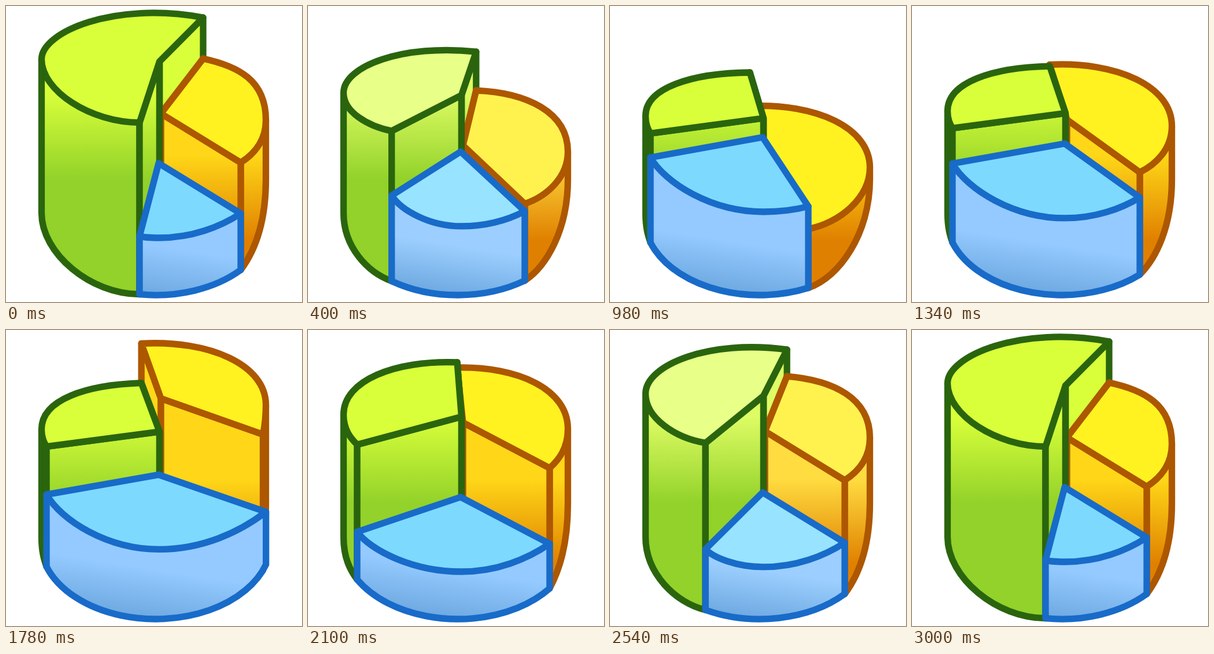
An HTML page with a canvas that plays this animation: 512 by 512 pixels, repeating every 3020 ms.

```html
<!DOCTYPE html>
<html>
<head>
<meta charset="utf-8">
<style>
html, body { margin: 0; width: 100%; height: 100%; overflow: hidden; background: #fff; }
canvas { display: block; width: 512px; height: 512px; }
</style>
</head>
<body>
<canvas id="stage" width="512" height="512"></canvas>
<script>
const ctx = document.getElementById('stage').getContext('2d');
const LOOP = 3020, LEFT = 61.5, RIGHT = 449.5, FLOOR = 380;
const FOOT = { x: 259, y: 365, rx: 200, ry: 135 };

// green, orange, blue: height of each slice's inner corner
// left, right, back: x of the three cuts; drop, rise: how far the left and back cuts reach
const full = { green: 96, orange: 186, blue: 272, left: 231, drop: 126, right: 406, back: 341, rise: 76, light: 0 };
const even = { green: 154, orange: 241, blue: 252, left: 145, drop: 76, right: 375, back: 291, rise: 75, light: 1 };
const low = { green: 194, orange: 268, blue: 227, left: 70, drop: 35, right: 343, back: 242, rise: 79, light: 0 };
const wide = { green: 176, orange: 118, blue: 250, left: 70, drop: 34, right: 450, back: 234, rise: 84, light: 0 };
const round = { green: 150, orange: 160, blue: 289, left: 85, drop: 60, right: 418, back: 258, rise: 94, light: 0 };
const tall = { green: 114, orange: 175, blue: 281, left: 165, drop: 98, right: 406, back: 306, rise: 80, light: 1 };

const keys = [[0, full], [80, full], [400, even], [690, low], [1060, low], [1640, wide],
  [1760, wide], [2100, round], [2540, tall], [2750, full], [LOOP, full]];

const mix = (a, b, t) => a + (b - a) * t;
const slope = (k, name) => k < 0 || k > keys.length - 2 ? 0
  : (keys[k + 1][1][name] - keys[k][1][name]) / (keys[k + 1][0] - keys[k][0]);
function tangent(k, name) {
  const a = slope(k - 1, name), b = slope(k, name);
  return a * b > 0 ? 2 * a * b / (a + b) : 0;
}

// Smooth path through the poses without overshoot
function poseAt(time) {
  let k = 0;
  while (k < keys.length - 2 && time >= keys[k + 1][0]) k++;
  const [t0, a] = keys[k], [t1, b] = keys[k + 1], d = t1 - t0, u = (time - t0) / d;
  const pose = {};
  for (const n in a) {
    pose[n] = mix(a[n], b[n], u * u * (3 - 2 * u))
      + d * u * (1 - u) * ((1 - u) * tangent(k, n) - u * tangent(k + 1, n));
  }
  return pose;
}

function tone(a, b, t) {
  return `rgb(${a.map((v, i) => Math.round(mix(v, b[i], t)))})`;
}

function fade(y0, y1, from, to, tilt = 0) {
  const g = ctx.createLinearGradient(265, y0, 265 - tilt, y1);
  g.addColorStop(0, from);
  g.addColorStop(1, to);
  return g;
}

function shape(fill, trace) {
  ctx.beginPath();
  trace();
  ctx.closePath();
  ctx.fillStyle = fill;
  ctx.fill();
  ctx.stroke();
}

const poly = (fill, ...pts) => shape(fill, () => pts.forEach(p => ctx.lineTo(...p)));

const footAngle = x => Math.acos((x - FOOT.x) / FOOT.rx);
const footY = x => FOOT.y + FOOT.ry * Math.sin(footAngle(x));

// Curve leaving the outer edge vertically and sweeping to the front
function sweep(x0, y0, x1, y1) {
  const dx = x1 - x0, dy = y1 - y0;
  ctx.bezierCurveTo(x0, y0 + dy / 2, x0 + dx / 2,
    y1 - dy * .25 * Math.max(0, 1 - Math.abs(dx) / 170), x1, y1);
}

function slice(s) {
  const { ax, ay, rx, ry, ex, ey, fx, fy, bend } = s, base = footY(fx);
  ctx.strokeStyle = s.line;
  poly(s.wall, [ax, ay], [rx, ry], [rx, ry + FLOOR - ay], [ax, FLOOR]);
  shape(s.wall, () => {
    ctx.moveTo(fx, fy);
    ctx.lineTo(ex, ey);
    ctx.lineTo(ex, bend);
    sweep(ex, bend, fx, base);
  });
  poly(s.wall, [ax, ay], [fx, fy], [fx, base], [ax, FLOOR]);
  shape(s.top, () => {
    ctx.moveTo(ax, ay);
    ctx.lineTo(rx, ry);
    ctx.bezierCurveTo(mix(rx, ex, .55), ry + s.lift, ex, mix(ey, ry, .65), ex, ey);
    sweep(ex, ey, fx, fy);
  });
}

function draw(time) {
  const p = poseAt(time), { left, right, back, light } = p;
  const reach = 64 + (450 - right) * .52;

  ctx.fillStyle = '#fff';
  ctx.fillRect(0, 0, 512, 512);
  ctx.lineWidth = 11.3;
  ctx.lineJoin = 'round';

  const green = {
    ax: 265.5, ay: p.green, rx: back, ry: p.green - p.rise, ex: LEFT, ey: p.green - 4,
    fx: left, fy: p.green + p.drop * .87 - 4, bend: 358, lift: (245 - back) * .3,
    line: '#2a650e', top: tone([217, 255, 58], [232, 255, 136], light),
    wall: fade(150, 300, tone([217, 255, 58], [222, 252, 100], light), '#92d22a')
  };
  const orange = {
    ax: 268, ay: p.orange, rx: back, ry: p.orange - 95, ex: RIGHT, ey: p.orange + 11,
    fx: Math.min(right, RIGHT - 5), fy: p.orange + reach - 2, bend: 300, lift: (back - 270) * .18,
    line: '#ad5700', top: tone([255, 242, 32], [255, 242, 78], light),
    wall: fade(258, 405, tone([255, 215, 24], [255, 220, 64], light), '#e08000')
  };
  (back < 265 ? [orange, green] : [green, orange]).forEach(slice);

  ctx.strokeStyle = green.line;
  ctx.beginPath();
  ctx.moveTo(green.ax, p.green);
  ctx.lineTo(green.ax, FLOOR);
  ctx.stroke();

  const leftY = p.blue + p.drop, rightY = p.blue + reach, dip = p.blue + 129;
  ctx.strokeStyle = '#186bc8';
  shape(fade(415, 505, tone([148, 202, 255], [156, 207, 255], light), '#6ca7df', 14), () => {
    ctx.moveTo(left, leftY);
    ctx.lineTo(right, rightY);
    ctx.ellipse(FOOT.x, FOOT.y, FOOT.rx, FOOT.ry, 0, footAngle(right), footAngle(left));
  });
  shape(tone([126, 217, 255], [152, 227, 255], light), () => {
    ctx.moveTo(264, p.blue);
    ctx.lineTo(left, leftY);
    ctx.bezierCurveTo(mix(left, 265, .13), mix(leftY, dip, .47), mix(left, 265, .54), dip, 265, dip);
    ctx.bezierCurveTo(mix(265, right, .4), dip, mix(right, 265, .25), mix(rightY, dip, .55), right, rightY);
  });
}

const start = performance.now();
function tick() {
  draw((performance.now() - start) % LOOP);
  requestAnimationFrame(tick);
}
tick();
</script>
</body>
</html>
```
